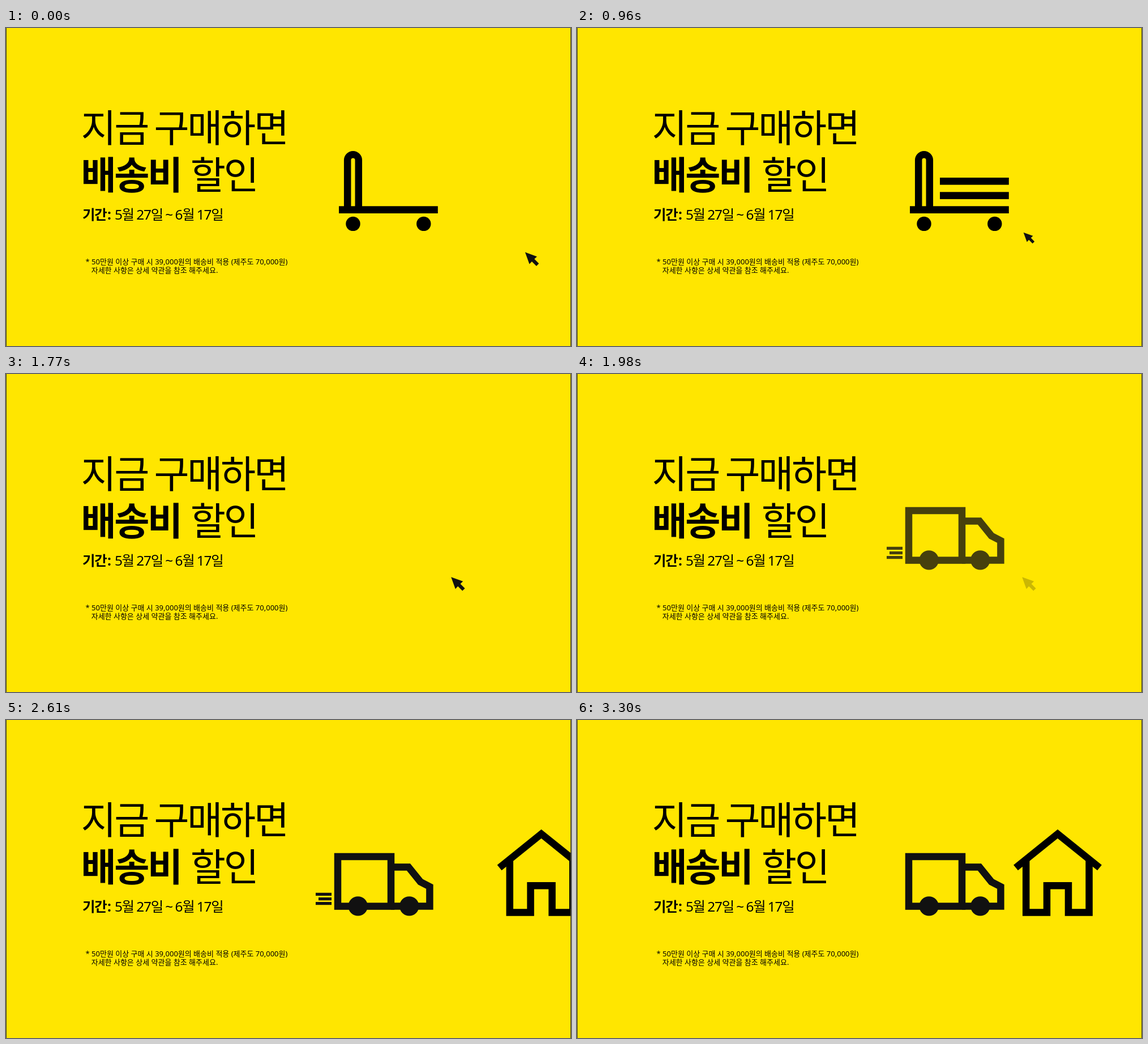
An HTML page with a canvas that plays this animation: 998x561 px, repeating every 5.4 s.

```html
<!DOCTYPE html>
<html lang="ko">
<head>
<meta charset="utf-8">
<title>배송비 할인</title>
<style>
  html, body { margin: 0; width: 100%; height: 100%; overflow: hidden; background: #ffe600; }
  canvas, svg { position: absolute; left: 0; top: 0; width: 998px; height: 561px; }
  text { font-family: "Noto Sans", "Noto Sans CJK KR", "Noto Sans CJK", sans-serif; fill: #000; white-space: pre; }
  .big { font-size: 67.6px; letter-spacing: -0.05em; word-spacing: -0.04em; }
  .mid { font-size: 24.4px; letter-spacing: -0.05em; word-spacing: -0.03em; }
  .small { font-size: 13px; }
  .bold { font-weight: 700; }
</style>
</head>
<body>
<canvas id="stage" width="998" height="561"></canvas>
<svg viewBox="0 0 998 561">
  <text class="big" x="132.4" y="200.8">지금 구매하면</text>
  <text class="big" x="132.4" y="283.8"><tspan class="bold">배송비</tspan> <tspan dx="5.5">할인</tspan></text>
  <text class="mid" x="135" y="337.7"><tspan class="bold">기간<tspan dx="1.5">:</tspan></tspan> <tspan dx="2.8">5월 27일 ~ 6월 17일</tspan></text>
  <text class="small" x="140.5" y="416.8">* 50만원 이상 구매 시 39,000원의 배송비 적용 (제주도 70,000원)</text>
  <text class="small" x="150.7" y="432.4">자세한 사항은 상세 약관을 참조 해주세요.</text>
</svg>
<script>
const W = 998, H = 561, LOOP = 5400, STEP = 30;
const YELLOW = [255, 230, 0], BLACK = [0, 0, 0], DARK = [17, 17, 17];
const LINE = 12.5;
const ctx = document.getElementById('stage').getContext('2d');

// Timeline, in ms
const MOVE_END = 300;
const CLICK = 440;
const CLICKS = 3;
const BARS = [[510, 289.3], [960, 264], [1410, 238.6]];
const SWAP = 1770, FADE = 270;
const HOUSE_STOP = 3030, HOUSE_SPEED = 0.23;
const LINES_OFF = 3300;

const clamp = v => Math.min(1, Math.max(0, v));
const ease = v => v * v * (3 - 2 * v);
const mix = (a, b, k) => a + (b - a) * k;

function rect(x0, y0, x1, y1) {
  ctx.fillRect(x0, y0, x1 - x0, y1 - y0);
}

function disc(x, y, r) {
  ctx.beginPath();
  ctx.arc(x, y, r, 0, Math.PI * 2);
  ctx.fill();
}

function trace(points) {
  ctx.beginPath();
  points.forEach(([x, y], i) => i ? ctx.lineTo(x, y) : ctx.moveTo(x, y));
}

// Blends from the background, so overlapping parts fade as one shape
function ink(color, strength = 1) {
  const rgb = YELLOW.map((v, i) => Math.round(mix(v, color[i], strength)));
  ctx.fillStyle = ctx.strokeStyle = `rgb(${rgb})`;
  ctx.lineWidth = LINE;
  ctx.lineJoin = 'miter';
}

function drawCart(t) {
  ink(BLACK);
  ctx.beginPath();
  ctx.moveTo(603.2, 320);
  ctx.arc(613, 233, 9.8, Math.PI, 0);
  ctx.lineTo(622.8, 320);
  ctx.stroke();
  rect(588, 314.3, 762.8, 327);
  disc(613, 345.4, 12.7);
  disc(737.8, 345.4, 12.7);
  for (const [start, y] of BARS) {
    if (t >= start) rect(641, y, 762.8, y + 12.6);
  }
}

function drawTruck(t, strength) {
  ink(DARK, strength);
  ctx.strokeRect(586, 241, 94, 87.6);
  trace([[680, 259.5], [711, 259.5], [732, 285.5], [748.4, 294], [748.4, 328.6], [680, 328.6]]);
  ctx.stroke();
  disc(621.7, 328.4, 17.2);
  disc(712.3, 328.4, 17.2);
  if (t < LINES_OFF) {
    rect(547, 304.8, 575, 310);
    rect(552, 313, 575, 318.2);
    rect(547, 321, 575, 326.2);
  }
}

function drawHouse(t) {
  ctx.save();
  ctx.translate(Math.max(0, HOUSE_STOP - t) * HOUSE_SPEED, 0);
  ink(BLACK);
  trace([[775, 260.5], [849, 201], [923, 260.5]]);
  ctx.stroke();
  trace([[793.2, 246], [793.2, 339.6], [830, 339.6], [830, 292.2],
         [868, 292.2], [868, 339.6], [904.6, 339.6], [904.6, 246]]);
  ctx.stroke();
  ctx.restore();
}

function drawCursor(t, strength) {
  const k = ease(clamp(t / MOVE_END));
  const beat = (t - MOVE_END) / CLICK;
  const press = beat > 0 && beat < CLICKS ? (1 - Math.cos(beat * Math.PI * 2)) / 2 : 0;
  const size = 1 - 0.2 * press;
  ctx.save();
  ctx.translate(mix(929.1, 798.4, k), mix(407.8, 370.4, k));
  ctx.scale(size, size);
  ctx.translate(-12.2, -12.2);
  ink(DARK, strength);
  trace([[0, 0], [21, 7.6], [16.4, 12], [24.4, 20], [20, 24.4], [12, 16.4], [7.6, 21]]);
  ctx.fill();
  ctx.restore();
}

function draw(t) {
  ink(YELLOW);
  ctx.fillRect(0, 0, W, H);
  const fade = clamp((t - SWAP) / FADE);
  if (t < SWAP) drawCart(t);
  if (fade < 1) drawCursor(t, 1 - fade);
  if (fade > 0) {
    drawTruck(t, fade);
    drawHouse(t);
  }
  ctx.fillStyle = '#45411a';
  ctx.fillRect(0, 0, 1, H);
  ctx.fillRect(W - 1, 0, 1, H);
}

const begin = performance.now();
function tick() {
  const t = (performance.now() - begin) % LOOP;
  draw(Math.floor(t / STEP) * STEP);
  requestAnimationFrame(tick);
}
tick();
</script>
</body>
</html>
```
